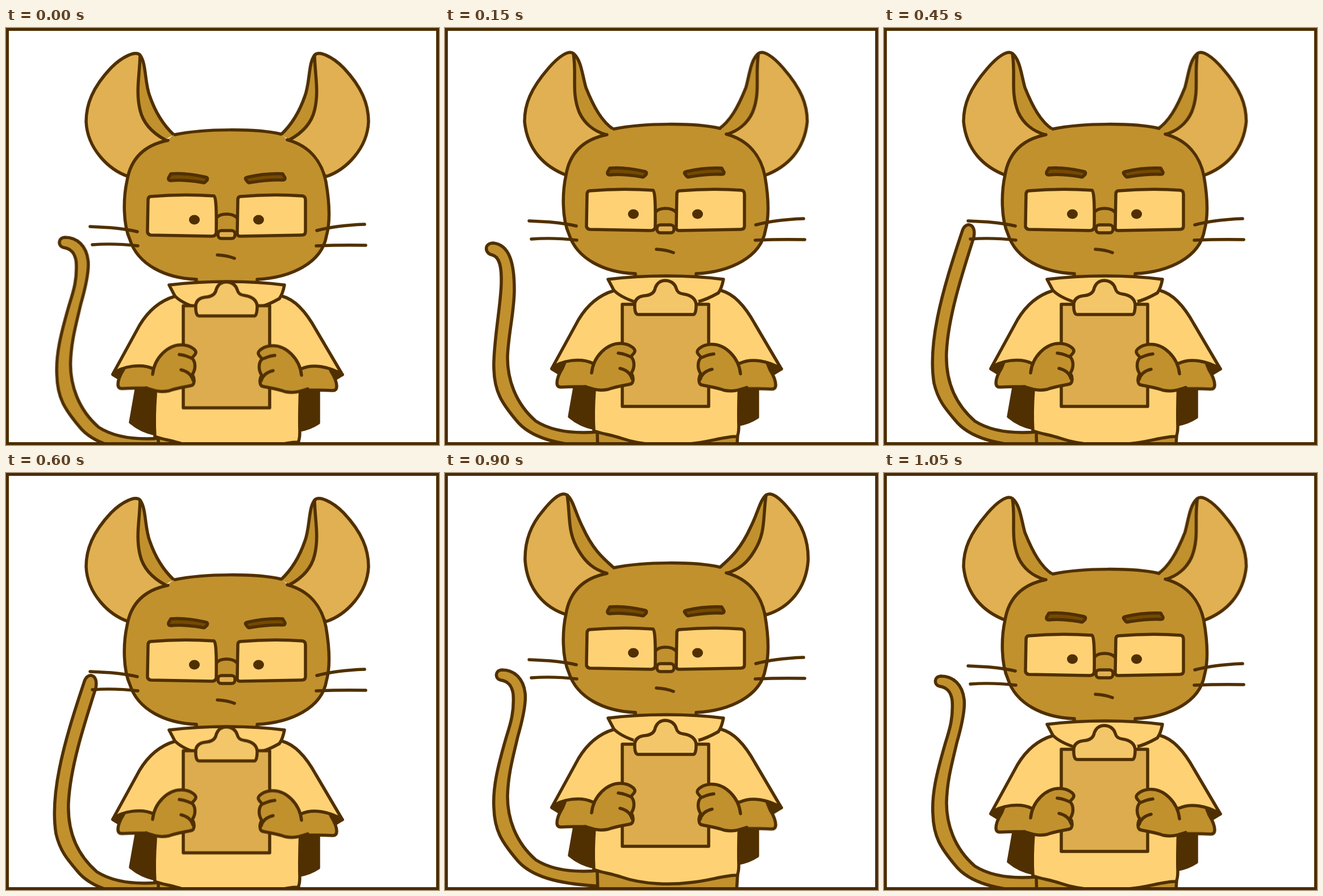
An HTML page that plays this animation: 762x735 px, repeating every 1.15 s.

```html
<!DOCTYPE html>
<html lang="en">
<head>
<meta charset="utf-8">
<title>Mouse with clipboard</title>
<style>
  html, body { margin: 0; width: 100%; height: 100%; overflow: hidden; background: #fff; }
  svg { display: block; width: 762px; height: 735px; }

  .line { fill: none; stroke: #503000; stroke-width: 5.5; stroke-linecap: round; stroke-linejoin: round; }
  .border { stroke: #4a2c00; stroke-width: 5; stroke-linejoin: miter; }
  .fur { fill: #c1912e; }
  .pinna { fill: #e0b052; }
  .cloth { fill: #ffd175; }
  .board { fill: #dcac4e; }
  .clip { fill: #f4c66a; }
  .brow { fill: #754a00; }
  .dark { fill: #503000; }
  .bare { stroke: none; }

  /* Eight held poses: 150 ms each, the last one 100 ms. */
  .body, .arms, .pose, .tail, .eyes { animation: 1.15s step-end infinite; }
  .body { animation-name: bob; }
  .arms { animation-name: carry; }
  .pose.up { animation-name: up; }
  .pose.mid { animation-name: mid; }
  .pose.down { animation-name: down; }
  .tail.centre { animation-name: tail-centre; }
  .tail.left { animation-name: tail-left; }
  .tail.right { animation-name: tail-right; }
  .eyes.open { animation-name: eyes-open; }
  .eyes.shut { animation-name: eyes-shut; }

  @keyframes bob {
    0%, 52.17% { transform: translateY(21px); }
    13.04%, 39.13%, 65.21%, 91.3%, 100% { transform: translateY(11px); }
    26.08%, 78.26% { transform: none; }
  }
  @keyframes carry {
    0%, 52.17% { transform: translateY(11.5px); }
    13.04%, 39.13%, 65.21%, 91.3%, 100% { transform: translateY(9px); }
    26.08%, 78.26% { transform: none; }
  }
  @keyframes up {
    0%, 39.13%, 91.3%, 100% { opacity: 0; }
    26.08%, 78.26% { opacity: 1; }
  }
  @keyframes mid {
    0%, 26.08%, 52.17%, 78.26% { opacity: 0; }
    13.04%, 39.13%, 65.21%, 91.3%, 100% { opacity: 1; }
  }
  @keyframes down {
    0%, 52.17% { opacity: 1; }
    13.04%, 65.21%, 100% { opacity: 0; }
  }
  @keyframes tail-centre {
    0% { opacity: 1; transform: translate(3.5px, 1px); }
    13.04%, 39.13% { opacity: 0; transform: none; }
    26.08%, 78.26%, 100% { opacity: 1; transform: none; }
  }
  @keyframes tail-left {
    0%, 26.08%, 100% { opacity: 0; }
    13.04% { opacity: 1; }
  }
  @keyframes tail-right {
    0%, 78.26%, 100% { opacity: 0; }
    39.13% { opacity: 1; }
  }
  @keyframes eyes-open {
    0%, 78.26%, 100% { opacity: 1; }
    65.21% { opacity: 0; }
  }
  @keyframes eyes-shut {
    0%, 78.26%, 100% { opacity: 0; }
    65.21% { opacity: 1; }
  }
</style>
</head>
<body>
<svg viewBox="0 0 762 735" class="line">
  <defs>
    <g id="ear-up">
      <path class="pinna" d="M215 39C206 32 190 44 172 67C148 95 140 125 141 155C145 205 175 238 215 250L285 177L245 140"/>
      <path class="fur" d="M285 177C262 170 248 158 236 138C215 105 221 80 215 39C226 48 230 72 242 95C260 135 278 150 297 167"/>
    </g>
    <g id="ear-mid">
      <path class="pinna" d="M226 45C218 38 200 50 182 71C150 108 140 135 140 165C145 215 175 245 215 260L283 188L246 148"/>
      <path class="fur" d="M283 188C262 182 245 168 236 148C222 112 232 85 226 45C240 56 242 85 248 105C262 140 276 165 297 179"/>
    </g>
    <g id="ear-down">
      <path class="pinna" d="M236 48C229 39 205 50 185 70C152 105 141 135 141 165C143 212 180 250 216 262L280 197L246 150"/>
      <path class="fur" d="M280 197C256 184 241 166 236 145C228 112 235 85 236 48C247 62 244 97 253 120C264 152 278 172 295 188"/>
    </g>
    <path id="forearm" class="fur" d="M300 570H215L207 590Q197 606 197 617Q197 624 204 624Q230 623 249 623L300 620"/>
    <g id="hand">
      <path class="fur" d="M258 599C261 570 285 546 310 547C325 548 335 556 334 561C333 566 326 569 328 571C334 578 334 590 328 599C333 608 331 616 328 618C318 621 300 623 287 628C271 631 262 628 247 623"/>
      <path d="M305 564Q313 565 318 567T328 571M308 591Q325 595 329 609"/>
    </g>
  </defs>

  <g class="body">
    <path class="tail centre fur" d="M268 701C230 704 190 701 160 682C123 650 110 607 110 570C111 530 120 500 128 465C138 430 143 405 141 388C138 362 122 347 100 347C87 348 88 363 98 365C112 367 118 376 120 390C122 420 116 440 108 465C92 520 84 555 86 590C87 630 100 650 125 680C150 712 200 724 268 728"/>
    <path class="tail left fur" d="M268 701C230 704 190 701 160 682C123 650 110 607 110 570C111 530 122 490 122 450C122 400 112 371 85 368C69 368 69 386 83 389C96 392 100 410 99 440C98 480 84 550 86 590C87 630 100 650 125 680C150 712 200 724 268 728"/>
    <path class="tail right fur" d="M268 701C230 704 190 701 160 682C123 650 108 607 110 560C113 500 135 430 158 358C163 332 143 330 138 346C120 400 104 450 94 500C84 550 84 590 88 615C95 645 108 660 125 680C150 712 200 724 268 728"/>
    <path class="dark" d="M232 600L219 674Q238 690 263 695V600ZM519 600H550V675Q535 685 517 688Z"/>
    <path class="fur" d="M268 703L269 740H513L515 706"/>
    <path class="cloth" d="M263 580V626Q260 665 262 699C275 704 292 706 310 712C350 726 400 726 430 722C465 719 490 709 513 709Q517 708 517 690Q516 660 519 580Z"/>
    <path class="dark" d="M188 590L206 601L214 580ZM592 590L574 601L566 580Z"/>
  </g>

  <g class="arms">
    <use href="#forearm"/>
    <use href="#forearm" transform="translate(779 3.5) scale(-1 1)"/>
  </g>

  <g class="body">
    <path class="cloth" d="M297 452C270 460 250 478 235 503L188 589C205 574 240 570 260 580H519C540 570 570 576 592 590L545 510C525 474 505 457 487 452"/>
  </g>

  <g class="pose up"><use href="#ear-up"/><use href="#ear-up" transform="translate(780) scale(-1 1)"/></g>
  <g class="pose mid"><use href="#ear-mid"/><use href="#ear-mid" transform="translate(777.5) scale(-1 1)"/></g>
  <g class="pose down"><use href="#ear-down"/><use href="#ear-down" transform="translate(779) scale(-1 1)"/></g>

  <g class="body">
    <path class="fur bare" d="M296 166H484L497 177L520 300L442 430H334L250 300L283 177Z"/>
    <path class="fur" d="M297 167C350 156 440 156 484 166M495 176C535 187 556 215 563 250C569 285 571 320 564 345C556 393 502 419 442 422V426M335 426V422C280 420 232 396 218 352C206 325 206 280 213 248C219 212 240 186 285 177"/>
    <path class="cloth" d="M287 432C350 424 430 424 490 432Q487 448 481 456Q460 468 443 472H335Q308 463 297 451Z"/>
    <path class="cloth bare" d="M332 469H446V485H332Z"/>

    <path class="brow" d="M290 236C312 234 335 238 352 242Q356 243 354 247L351 250Q349 253 344 251C325 248 308 246 290 248Q285 248 286 243Z"/>
    <path class="brow" d="M487 236C465 235 442 238 425 242Q420 243 422 246L425 250Q427 253 432 251C452 248 470 246 487 247Q492 247 491 243Z"/>
    <path class="cloth" d="M254 276Q310 271 366 275Q371 276 370 340Q369 346 362 346L255 344Q248 343 249 335L250 282Q250 277 254 276Z"/>
    <path class="cloth" d="M412 276Q470 271 522 275Q527 276 527 282V338Q527 344 520 344L412 346Q406 346 407 338L408 281Q408 277 412 276Z"/>
    <path d="M371 313C378 305 398 305 406 313"/>
    <rect class="pinna" x="373" y="336" width="30" height="14" rx="6"/>
    <path d="M372 379Q390 380 402 385"/>
    <g class="eyes open dark bare">
      <ellipse cx="331.5" cy="317" rx="9.5" ry="8.5"/>
      <ellipse cx="444.5" cy="317" rx="9.5" ry="8.5"/>
    </g>
    <path class="eyes shut dark bare" d="M323 314h17v7h-17zM436 314h17v7h-17z"/>
    <path d="M148 329L185 331Q215 334 231 338M152 361Q190 358 232 363M547 336Q580 327 631 325M546 363Q590 361 633 362"/>
  </g>

  <g class="arms">
    <path class="board" d="M312 478H464V658H312Z"/>
    <path class="clip" d="M340 496Q333 496 334 476Q336 465 350 463Q368 462 370 449Q375 436 388 436Q403 437 407 450Q409 459 420 460Q440 463 442 478Q442 496 437 496Z"/>
    <use href="#hand"/>
    <use href="#hand" transform="translate(778 1.5) scale(-1 1)"/>
  </g>

  <rect class="border" x="2.5" y="2.5" width="757" height="730"/>
</svg>
</body>
</html>
```
